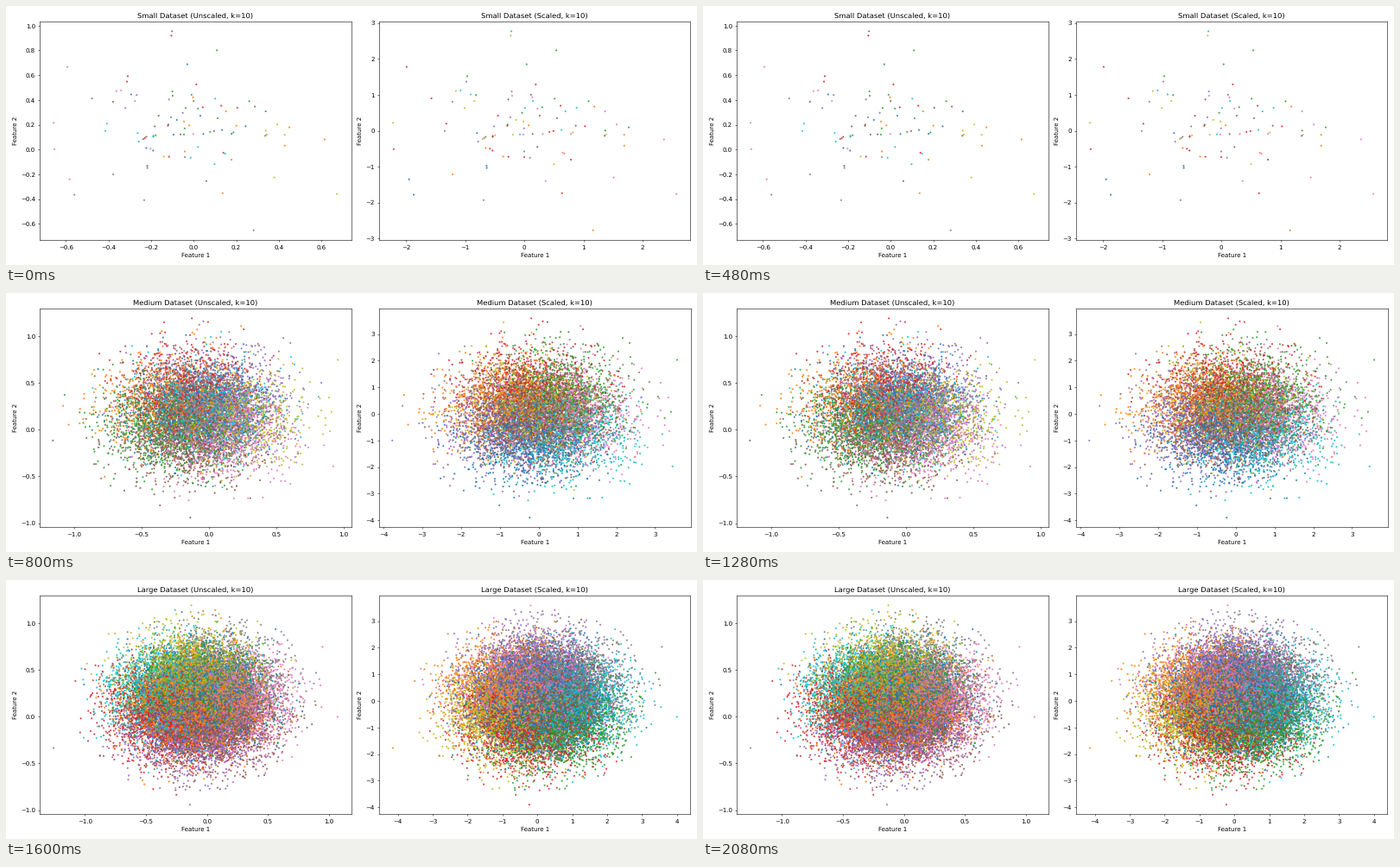
Animation, 800 px wide and 300 px high, one loop 2400 ms. Source, as a matplotlib script:

```python
import numpy as np
import matplotlib.pyplot as plt
from matplotlib.animation import FuncAnimation

W, H, DPI = 800, 300, 50

# Distinctive points in scaled units; the rest is seeded noise
SMALL_KEYS = [(-.22, 2.77), (-.23, 2.65), (.54, 2.24), (-1.99, 1.78),
              (-2.21, -.51), (-2.22, .22), (-1.95, -1.35), (-1.87, -1.78),
              (-.69, -1.93), (1.16, -2.77), (2.57, -1.76), (2.36, -.24),
              (-.98, 1.37), (1.51, -1.3)]
FAR = [(-.19, 3.59), (-.23, -3.9), (3.57, 2.03)]
MEDIUM_KEYS = FAR + [(-3.77, -1), (3.45, -1.97)]
LARGE_KEYS = FAR + [(-4.14, -1.77), (4, -.6)]


def cloud(rng, n, keys, spread, reach):
    """Round Gaussian cloud cut off at a radius, with key points added."""
    z = rng.normal(0, spread, (n, 2))
    return np.vstack([z[np.hypot(*z.T) < reach], keys])


def paint(rng, z, colours, noise=1.25):
    """Colour points by the best of ten blurred clusters: seven on a ring,
    counterclockwise from the right, then a dominant core and two beside it."""
    names = colours.split()
    angle = 2 * np.pi * np.arange(10) / 7
    radius = np.array([1] * 7 + [0, .3, .3])
    centres = radius * np.array([np.cos(angle), np.sin(angle)])
    score = z @ centres - radius ** 2 / 2
    score[:, 7] += .4
    best = (score + rng.normal(0, noise, score.shape)).argmax(axis=1)
    rgb = np.array([plt.matplotlib.colors.to_rgb("tab:" + c) for c in names])
    return rgb[best]


def scene(name, seed, shape, raw, scaled, mean, dev, limits):
    rng = np.random.default_rng(seed)
    z = cloud(rng, *shape)
    return (name, z, paint(rng, z, raw), paint(rng, z, scaled),
            np.array(mean), np.array(dev), np.array(limits))


# limits are the lower left and upper right corners in scaled units
SCENES = [
    scene("Small", 4, (92, SMALL_KEYS, .82, 1.9),
          "orange green red pink purple gray olive brown blue cyan",
          "pink green cyan purple blue gray orange red brown olive",
          (-.0407, .151), (.2778, .290),
          [(-2.458, -3.048), (2.809, 3.048)]),
    scene("Medium", 1, (10000, MEDIUM_KEYS, 1, 3.6),
          "olive purple red orange green brown pink gray cyan blue",
          "pink green red orange purple blue cyan brown gray olive",
          (-.0706, .168), (.2879, .2842),
          [(-4.114, -4.26), (3.913, 3.967)]),
    scene("Large", 2, (25000, LARGE_KEYS, 1, 3.6),
          "pink gray olive cyan red purple brown orange blue green",
          "cyan gray purple orange olive red green blue brown pink",
          (-.0745, .168), (.2858, .2842),
          [(-4.541, -4.26), (4.392, 3.967)]),
]

plt.rcParams["font.family"] = "DejaVu Sans"
plt.rcParams["text.hinting"] = "none"
fig, axes = plt.subplots(1, 2, figsize=(W / DPI, H / DPI), dpi=DPI)


def draw_panel(ax, points, colours, limits, title):
    ax.clear()
    ax.scatter(*points.T, c=colours, s=4, alpha=.8)
    ax.set_xlim(limits[:, 0])
    ax.set_ylim(limits[:, 1])
    ax.set_title(title)
    ax.set_xlabel("Feature 1")
    ax.set_ylabel("Feature 2")


def update(i):
    name, z, raw, scaled, mean, dev, limits = SCENES[i % len(SCENES)]
    draw_panel(axes[0], z * dev + mean, raw, limits * dev + mean,
               f"{name} Dataset (Unscaled, k=10)")
    draw_panel(axes[1], z, scaled, limits,
               f"{name} Dataset (Scaled, k=10)")
    fig.tight_layout()
    return axes


anim = FuncAnimation(fig, update, frames=len(SCENES), interval=800,
                     repeat=True, repeat_delay=0, blit=False)
plt.show()
```
